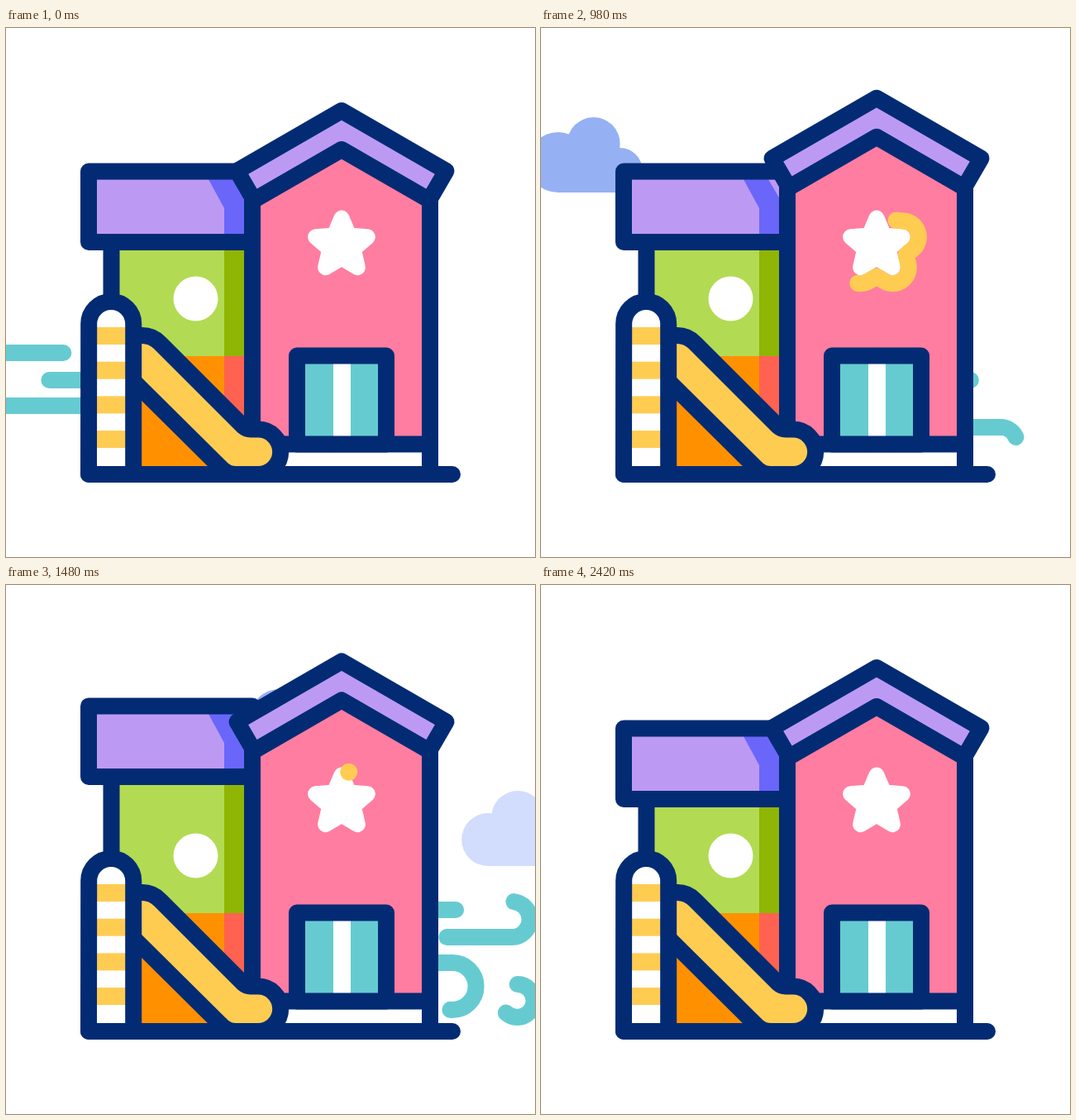
An HTML page with a canvas for the animation above (3.6 s loop, 640 by 640 pixels).

```html
<!DOCTYPE html>
<html lang="en">
<head>
<meta charset="utf-8">
<title>Playhouse</title>
<style>
  html, body { margin: 0; width: 100%; height: 100%; overflow: hidden; background: #fff; }
  canvas { display: block; width: 100vw; height: 100vh; }
</style>
</head>
<body>
<canvas id="stage" width="640" height="640"></canvas>
<script>
const ctx = document.getElementById('stage').getContext('2d');
const LOOP = 3600, TAU = Math.PI * 2, RAD = Math.PI / 180;
const NAVY = '#032b74', PURPLE = '#bc9af4', VIOLET = '#6a66fa', GREEN = '#b2da52',
      MOSS = '#8fb505', ORANGE = '#ff9100', CORAL = '#ff6250', PINK = '#ff7da0',
      YELLOW = '#ffcc52', TEAL = '#66cbd1', WHITE = '#fff',
      PALE = '#d2dcfd', SKY = '#95b1f4';

const clamp = (v, a = 0, b = 1) => Math.min(b, Math.max(a, v));
const ramp = (t, a, b) => clamp((t - a) / (b - a));
const smooth = u => u * u * (3 - 2 * u);

function rect(color, x, y, x2, y2) {
  ctx.fillStyle = color;
  ctx.fillRect(x, y, x2 - x, y2 - y);
}

function disc(color, x, y, r) {
  ctx.fillStyle = color;
  ctx.beginPath();
  ctx.arc(x, y, r, 0, TAU);
  ctx.fill();
}

function stroke(color, width = 20) {
  ctx.strokeStyle = color;
  ctx.lineWidth = width;
  ctx.stroke();
}

function trace(pts, close) {
  ctx.beginPath();
  pts.forEach(([x, y]) => ctx.lineTo(x, y));
  if (close) ctx.closePath();
}

function poly(color, pts) {
  trace(pts, true);
  ctx.fillStyle = color;
  ctx.fill();
}

function line(pts, color = NAVY) {
  trace(pts);
  stroke(color);
}

function cloud(color, x, bottom, lobes) {
  lobes.forEach(([dx, y, r]) => disc(color, x + dx, y, r));
  rect(color, x + lobes[0][0], bottom - 42, x + lobes[2][0], bottom);
}

function clouds(t) {
  cloud(PALE, 57 + 0.617 * (t - 680), 340, [[32, 308, 32], [68, 281, 32], [108, 309, 31]]);
  cloud(SKY, 63 + 0.62 * (t - 980), 199, [[-43, 162.5, 36.5], [0, 140, 32], [32, 172, 27]]);
}

// A straight run into a curl; tail and head are measured from where the curl begins.
function gust(x, y, r, dir, tail, head) {
  if (head <= tail) return;
  const a0 = -dir * Math.PI / 2;
  ctx.beginPath();
  if (tail < 0) {
    ctx.moveTo(x + tail, y);
    ctx.lineTo(x + Math.min(head, 0), y);
  }
  if (head > 0) {
    ctx.arc(x, y + dir * r, r, a0 + dir * Math.max(tail, 0) / r, a0 + dir * head / r, dir < 0);
  }
  stroke(TEAL);
}

function wind(t) {
  const s = 0.125 * (t - 1180);
  gust(506.5 + s, 393, 20, 1, -45 + 0.2 * (t - 1740), Math.min(0, 0.2 * (t - 1450)));
  gust(574.5 + s, 426, 21.5, -1, -79 + 0.2 * (t - 1480), Math.min(84, 8 + 0.19 * (t - 1180)));
  gust(502.5 + s, 457, 28.5, 1, -16.5 + 0.23 * (t - 1740), Math.min(112, 20 + 0.24 * (t - 1180)));
  gust(581 + s, 483, 20, 1, -33 + 0.11 * (t - 1180), Math.min(78, 53 + 0.15 * (t - 1180)));
}

function annex(lift) {
  rect(GREEN, 127, 200, 264, 397);
  rect(MOSS, 264, 200, 298, 397);
  rect(ORANGE, 127, 397, 264, 540);
  rect(CORAL, 264, 397, 298, 540);
  line([[127.5, 210], [127.5, 350]]);
  disc(WHITE, 229.5, 327.5, 27);

  ctx.save();
  ctx.translate(0, lift);
  rect(PURPLE, 100, 173, 298, 259);
  poly(VIOLET, [[239.5, 173], [269, 173], [298, 222], [298, 259], [264, 259], [264, 218]]);
  poly(PURPLE, [[239, 173], [245, 183], [239, 183]]);
  trace([[100, 173.5], [298, 173.5], [298, 259], [100, 259]], true);
  stroke(NAVY);
  ctx.restore();
}

function tower(lift) {
  poly(PINK, [[298, 208 + lift], [406, 147 + lift], [513, 208 + lift], [513, 504], [298, 504]]);
  rect(WHITE, 298, 504, 513, 540);
  line([[298, 208 + lift], [298, 540]]);
  line([[513, 208 + lift], [513, 540]]);
  line([[298, 503.5], [513, 503.5]]);

  const roof = [[406, 100], [532.5, 173], [512, 208.2], [406, 147], [300, 208.2], [279.5, 173]]
    .map(([x, y]) => [x, y + lift]);
  poly(PURPLE, roof);
  trace(roof, true);
  stroke(NAVY);

  rect(TEAL, 352, 397, 460, 503);
  rect(WHITE, 396, 397, 417, 503);
  trace([[352, 503.5], [352, 396.5], [460, 396.5], [460, 503.5]], true);
  stroke(NAVY);
}

function slide() {
  line([[100, 540], [540, 540]]);

  ctx.beginPath();
  ctx.moveTo(154, 372);
  ctx.lineTo(165, 372);
  ctx.quadraticCurveTo(177, 372, 186, 381);
  ctx.lineTo(287, 482);
  ctx.quadraticCurveTo(291, 485.5, 296, 485.5);
  ctx.lineTo(305, 485.5);
  ctx.arc(305, 512.8, 27.2, -Math.PI / 2, Math.PI / 2);
  ctx.lineTo(278, 540);
  ctx.quadraticCurveTo(269, 540, 262, 534);
  ctx.lineTo(154, 427);
  ctx.closePath();
  ctx.fillStyle = YELLOW;
  ctx.fill();
  stroke(NAVY);

  ctx.beginPath();
  ctx.moveTo(100, 540);
  ctx.arc(127.2, 358, 27, Math.PI, 0);
  ctx.lineTo(154.2, 540);
  ctx.closePath();
  ctx.fillStyle = WHITE;
  ctx.fill();
  for (let i = 0; i < 4; i++) rect(YELLOW, 102, 362 + i * 41.7, 152, 383 + i * 41.7);
  stroke(NAVY);
}

const STAR = { x: 406, y: 263, outer: 33, inner: 15 };
const polar = (x, y, r, deg) => [x + r * Math.cos(deg * RAD), y + r * Math.sin(deg * RAD)];

function star() {
  const pts = [];
  for (let i = 0; i < 10; i++) {
    pts.push(polar(STAR.x, STAR.y, i % 2 ? STAR.inner : STAR.outer, -90 + 36 * i));
  }
  poly(WHITE, pts);
  trace(pts, true);
  stroke(WHITE, 19);
}

// Star contour grown outward by k, starting just right of the top tip.
function starContour(k) {
  const pts = [polar(...polar(STAR.x, STAR.y, STAR.outer, -90), k, -23)];
  for (let i = 1; i <= 5; i++) {
    const a = -90 + 72 * i;
    const tip = polar(STAR.x, STAR.y, STAR.outer, a);
    pts.push(polar(STAR.x, STAR.y, STAR.inner + 1.16 * k, a - 36));
    for (let j = -8; j <= 8; j++) pts.push(polar(...tip, k, a + 67.1 * j / 8));
  }
  return pts;
}

function starTrail(t) {
  if (t < 660 || t > 1500) return;
  const bump = clamp(1 - Math.abs(t - 970) / 225);
  const pts = starContour(9.5 + 10 * smooth(bump));
  let len = 0;
  for (let i = 1; i < pts.length; i++) {
    len += Math.hypot(pts[i][0] - pts[i - 1][0], pts[i][1] - pts[i - 1][1]);
  }
  const head = ramp(t, 748, 1208), tail = ramp(t, 964, 1424);
  if (head - tail < 0.002) {
    disc(YELLOW, ...pts[0], 10.5);
    return;
  }
  ctx.setLineDash([len * (head - tail), len * 2]);
  ctx.lineDashOffset = -len * tail;
  line(pts, YELLOW);
  ctx.setLineDash([]);
}

function rays(t) {
  const head = 22 * ramp(t, 650, 760), tail = 22 * ramp(t, 760, 870);
  if (head <= tail) return;
  [[410, 339, -90], [367.5, 362, -150], [452, 362.5, -30], [385, 452.5, 150]].forEach(([x, y, a]) =>
    line([polar(x, y, tail, a), polar(x, y, head, a)], YELLOW));
}

const hop = (t, a, b, c, d) => -37 * (smooth(ramp(t, a, b)) - smooth(ramp(t, c, d)));

function draw(t) {
  rect(WHITE, 0, 0, 640, 640);
  ctx.lineCap = ctx.lineJoin = 'round';
  clouds(t);
  wind(t);
  annex(hop(t, 1010, 1330, 1345, 1745));
  tower(hop(t, 840, 1160, 1190, 1600));
  star();
  starTrail(t);
  rays(t);
  slide();
}

function tick() {
  draw(performance.now() % LOOP);
  requestAnimationFrame(tick);
}
tick();
</script>
</body>
</html>
```
